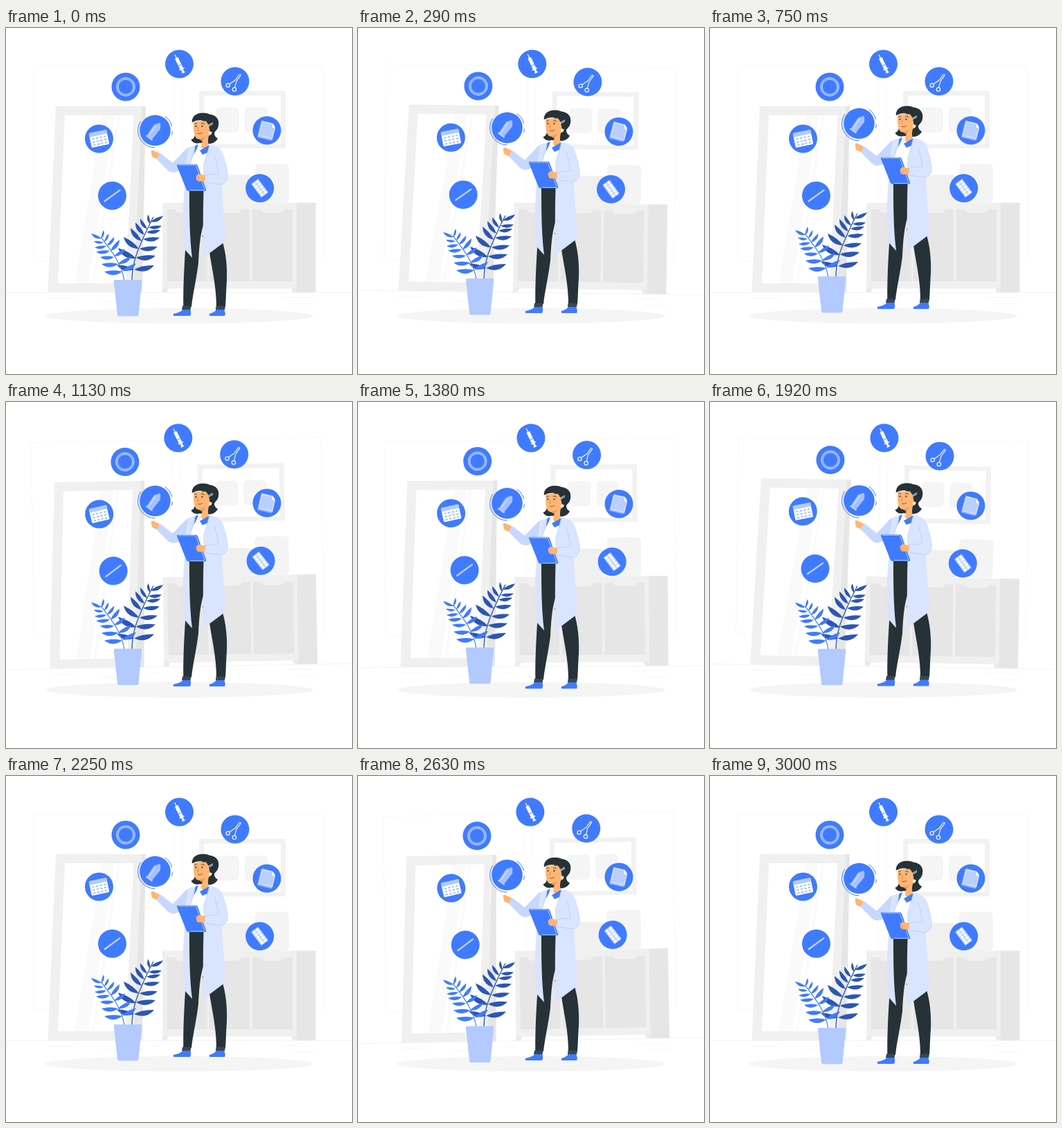
Animation of 500 by 500 pixels, one loop 3040 ms. Source, as an HTML page with a canvas:

```html
<!DOCTYPE html>
<html lang="en">
<head>
<meta charset="utf-8">
<title>Doctor with floating icons</title>
<style>
html, body { margin: 0; width: 100%; height: 100%; overflow: hidden; background: #fff; }
canvas { display: block; width: 100vw; height: 100vh; }
</style>
</head>
<body>
<canvas id="stage"></canvas>
<script>
const canvas = document.getElementById('stage');
const ctx = canvas.getContext('2d');
const dpr = Math.max(1, window.devicePixelRatio || 1);
canvas.width = canvas.height = 500 * dpr;

const BLUE = '#407bff', NAVY = '#2c56b3', PALE = '#b3caff', COAT = '#d9e4ff';
const SKIN = '#ffb573', HAIR = '#263238', PANTS = '#263238';
const LOOP = 3040, FPS = 24, RAD = Math.PI / 180;

function fill(color, d) {
  ctx.fillStyle = color;
  ctx.fill(new Path2D(d));
}
function line(color, width, d) {
  ctx.strokeStyle = color;
  ctx.lineWidth = width;
  ctx.stroke(new Path2D(d));
}
function box(color, x, y, w, h, r = 0) {
  ctx.fillStyle = color;
  ctx.beginPath();
  ctx.roundRect(x, y, w, h, r);
  ctx.fill();
}
function disc(color, x, y, r, ry = r) {
  ctx.fillStyle = color;
  ctx.beginPath();
  ctx.ellipse(x, y, r, ry, 0, 0, 7);
  ctx.fill();
}
function arc(color, width, x, y, r, from = 0, to = 360) {
  ctx.strokeStyle = color;
  ctx.lineWidth = width;
  ctx.beginPath();
  ctx.arc(x, y, r, from * RAD, to * RAD);
  ctx.stroke();
}
function lift(dy, draw) {
  ctx.save();
  ctx.translate(0, dy);
  draw();
  ctx.restore();
}
function turn(deg, x, y, draw) {
  ctx.save();
  ctx.translate(x, y);
  ctx.rotate(deg * RAD);
  ctx.translate(-x, -y);
  draw();
  ctx.restore();
}
// Local axes centred on x, y and tilted
function local(x, y, deg, draw) {
  ctx.save();
  ctx.translate(x, y);
  ctx.rotate(deg * RAD);
  draw();
  ctx.restore();
}

function room() {
  // wall panels and floor
  ctx.strokeStyle = '#f8f8f8';
  ctx.lineWidth = 0.8;
  ctx.strokeRect(39, 55, 204, 282.5);
  ctx.strokeRect(255, 55, 203, 282.5);
  line('#f0f0f0', 0.8, 'M0 382.4H500');
  line('#f5f5f5', 0.8, 'M60 390.5H97M135 395.5H196M400 389.5H441M415 398.5H448M206 391H222');

  // mirror
  fill('#e6e6e6', 'M195 113H202L197 382H184Z');
  fill('#f0f0f0', 'M72 113H196.5L184.5 382H60.5Z');
  fill('#fff', 'M85 126H184.5L173 369H75Z');
  fill('#fafafa', 'M139 126H157L119 369H99Z M162 126H165L127.5 369H124Z');

  // picture
  box('#f2f2f2', 279, 91, 125, 83);
  box('#fff', 286, 97.5, 111, 70);
  box('#f5f5f5', 303, 115, 34, 36, 6);
  box('#f5f5f5', 345, 115, 33, 36, 6);

  // cabinet
  box('#f0f0f0', 300, 212.5, 57, 40, 6);
  box('#f4f4f4', 360, 196.5, 49, 56, 6);
  box('#e6e6e6', 419.5, 252.5, 28, 129.5);
  box('#f0f0f0', 226, 252.5, 194, 124);
  fill('#ebebeb', 'M226 376H235L232 382H226Z M412 376H420V382H414Z');
  for (const x of [232.5, 294, 356])
    fill('#e6e6e6', `M${x} 262H${x + 11}Q${x + 14} 267 ${x + 19} 267H${x + 39}Q${x + 44} 267 ${x + 47} 262H${x + 58}V366H${x}Z`);
}

function syringe() {
  box('#fff', -0.6, -15, 1.2, 6);
  box('#fff', -2.5, -10, 5, 18, 1);
  box(BLUE, -2.5, 1.5, 5, 0.8);
  box('#fff', -4, 7.5, 8, 1.4);
  box('#fff', -1.5, 8, 3, 5);
  box('#fff', -2.4, 12.8, 4.8, 1.6, 0.6);
}
function scissors() {
  line('#fff', 1.1, 'M-8.3 4.2L0 -1.5L6 -9.5M-0.5 9.2L2 0L8 -8.5Q8 -10.3 6 -9.5');
  arc('#fff', 1.2, -10.3, 5.7, 2.6);
  arc('#fff', 1.2, -1, 11.8, 2.7);
}
function pad() {
  box('#8fb2ff', -11, -10, 21, 23, 1);
  fill('#d0deff', 'M-10.5 -12H6L11 -6V11H-10.5Z');
  box('#b3caff', -8.5, -9.5, 17.5, 18.5);
  fill('#fff', 'M6 -12V-6H11Z');
  for (let y = -7; y < 9; y += 3) line('#cfddff', 0.7, `M-7.5 ${y}H${y < -5 ? 4 : 8}`);
}
function pills() {
  box('#c6d7ff', -6.3, -12.3, 12.6, 24.6, 1);
  for (let i = 0; i < 10; i++) disc('#fff', i % 2 ? 2.9 : -2.9, (i >> 1) * 4.7 - 9.4, 2);
}
function stick() {
  ctx.lineCap = 'round';
  line('#c4d6ff', 2.2, 'M-13.5 0H13.5');
  ctx.lineCap = 'butt';
}
function calendar() {
  box('#fff', -13, -10.5, 26, 21, 1.5);
  box(PALE, -13, -10.5, 26, 5.6, 1.5);
  for (let i = 0; i < 12; i++)
    box('#a9c4ff', (i % 4) * 5.6 - 10, Math.floor(i / 4) * 4.5 - 2.6, 3.4, 2.2, 0.4);
}
function ring() {
  arc('#86aaff', 3.4, 0, 0, 12);
  arc('#c0d3ff', 0.9, 0, 0, 13.3);
  arc('#b3caff', 0.8, 0, 0, 10.7);
}

const icons = [
  [250.5, 52, -26, syringe],
  [331, 77, 0, scissors],
  [377, 148, 14, pad],
  [366.7, 231.5, -37, pills],
  [153.5, 242.3, -36, stick],
  [134.5, 160, -12, calendar],
  [173, 85, 0, ring]
];
function orbit() {
  for (const [x, y, tilt, draw] of icons) {
    disc(BLUE, x, y, 20.5);
    local(x, y, tilt, draw);
  }
}

// A leaf with its belly on the lower side
function leaf(color, bx, by, tx, ty) {
  const dx = tx - bx, dy = ty - by, side = Math.sign(dx);
  const ctrl = (at, k) => `${bx + dx * at - dy * k * side} ${by + dy * at + dx * k * side}`;
  fill(color, `M${bx} ${by}Q${ctrl(0.52, 0.38)} ${tx} ${ty}Q${ctrl(0.42, -0.14)} ${bx} ${by}`);
}
// Each leaf: base x, y, tip x, y
const darkLeaves = [
  [208, 283, 205.5, 269.5], [204, 291, 194, 275.5], [200, 299, 187, 281],
  [196, 308, 180, 289], [192, 319, 170, 302], [188, 333, 162, 318], [185, 349, 160, 342],
  [209, 280, 227, 271.5], [206, 288, 225, 286], [203, 295, 223, 292],
  [198, 305, 222, 303], [193, 319, 219, 316], [188, 332, 216, 329], [185, 349, 214, 343]
];
const brightLeaves = [
  [138, 304, 123, 297], [141, 310, 127, 308], [145, 315, 128, 317],
  [150, 322, 130, 323.5], [156, 331, 136, 331], [162, 341, 138, 341], [168, 352, 142, 352],
  [138, 304, 141, 292], [142, 309, 148, 297], [146, 315, 156.5, 302],
  [151, 322, 164, 306], [156, 330, 172, 319], [162, 341, 181, 330], [168, 351, 188, 340]
];
function plant() {
  line(NAVY, 1.3, 'M182 366C182 340 190 322 198 304Q206 286 213 273');
  darkLeaves.forEach(l => leaf(NAVY, ...l));
  line(BLUE, 1.2, 'M171 366C168 342 154 324 137 302');
  brightLeaves.forEach(l => leaf(BLUE, ...l));
  fill(PALE, 'M157 364H195Q196.5 364 196.3 366L191.5 414Q191.2 416.5 189 416.5H163.5Q161.3 416.5 161 414L155.8 366Q155.6 364 157 364Z');
}

function badge() {
  disc(BLUE, 215.5, 148, 22.3);
  arc(BLUE, 1, 215.5, 148, 24.9, 90, 213);
  arc(BLUE, 1, 215.5, 148, 24.9, -55, -14);
  arc(BLUE, 1, 215.5, 148, 24.9, 3, 16);
  local(214, 149, 36, () => {
    fill('#a3c0ff', 'M-4.6 12L-5.4 -5C-5.8 -10 -2.4 -10.5 -1.8 -13Q0 -16 2 -13C2.8 -10.5 6 -10 5.4 -5L4.6 12Z');
    fill('#c3d5ff', 'M-3.4 10L-4 -5Q-3.6 -8 -1.4 -9L-1.4 10Z');
    box('#bdd1ff', -5.8, 10.8, 11.6, 2.2, 1.1);
  });
}

function legs() {
  fill(PANTS, 'M264 232H286L285 285C280 302 279 320 278 340C275 364 270 384 268 403H256.3C256 372 257.5 346 259 322C264 298 264 262 264 232Z');
  fill(PANTS, 'M284 300L312 306C318 324 320 346 319 366C318 380 318 391 317 403H304C304 375 298 350 294 324Z');
  fill('#37474f', 'M255 401.5H267.5L266.5 407.5H254Z M303.5 401.5H317L316 407.5H303Z');
  fill(BLUE, 'M256 407H266.5Q268 412 266 416H243Q241 415.5 242 413Q251 411.5 256 407Z');
  fill(BLUE, 'M304 407H315Q318 412 316 416H295Q293 415.5 294 413Q301 411 304 407Z');
}

function head() {
  // bob and rear lobe
  fill(HAIR, 'M290 125C300 123 309 130 307 140C306 146 302 149 301 152C301 156 304 158.5 306 159.5C303 166 296 168 290 167L280 166C274 168 269 165 267.5 161.5C272 160 274 155 273 148Z');
  fill(SKIN, 'M271.5 135C270.5 145 271 152 274 158C276 161 281 161.5 284 160L282 172L286 176L293 171Q291 163 293 156Q299 153 298 148L294 134Z');
  fill('#e59a5c', 'M279 160.6Q284 160 288 156Q286 162 282.5 163Z');
  // cap and fringe
  fill(HAIR, 'M268.8 136.5C268 128 275 122.5 284 122.7C290 122.8 295 124 297 127C304 128 308.5 133 307 141C306 147 303 149 299 151L294.5 149C294 144 293 139 289 134.5C282 132.5 275 132.5 268.8 136.5Z');
  disc(HAIR, 274.5, 142, 0.9, 1.2);
  disc(HAIR, 283.5, 142, 0.9, 1.2);
  line(HAIR, 0.8, 'M272.3 138.7Q274 137.3 276 138.1M282 138.1Q284.5 137 287 139');
  line('#dc8350', 0.8, 'M278 143L276.5 148H279');
  line('#7b4028', 0.8, 'M277 152.2Q280.5 154 284 151.2');
  disc('#fff', 295, 152, 2);
  line('#fff', 0.9, 'M292 140.5L299 136.8M293 142L299 138.6');
}

function woman() {
  badge();
  legs();
  // raised arm
  fill(SKIN, 'M209.5 178Q211 175.5 214 177.5L221 180.5L224 186L219 190L214.5 187.5Q210.5 187 210.5 183Z');
  fill('#c7d8ff', 'M223 181L241 195L261 174L272 170L269 196L248 207.5Q240 211 234 206L217.5 189Z');
  line(PALE, 0.7, 'M241 195L247 197');

  fill('#fff', 'M273 174L292 174L288 230H264L266 195Z');
  head();
  fill(BLUE, 'M273.5 170L278 168L276 174L271 184Z');
  fill(BLUE, 'M280 177L293.5 169.5L294 175L291 180L284 183Z');
  // coat
  fill(COAT, 'M273 170L263 174L260 195L257.5 238C255 270 255 295 256.5 318L269 332C265 300 265 265 265 236L266 197L272 182Z');
  fill(COAT, 'M294 169C303 170 310 173 313 182L312 235L317 298L316 309L286 331.5C284.5 300 284.5 270 285.5 240L285 200L291 180Z');
  line(PALE, 0.6, 'M294 169L291 180L285 200M273 171L266 197');
  // tablet
  fill(BLUE, 'M248.5 197H274Q276 197 277 199L289 233Q289.5 235.5 287.5 235.5H264Q261.5 235.5 260.5 233L247 199Q246.5 197 248.5 197Z');
  line('#dbe6ff', 0.7, 'M249 198H272.5Q274.3 198 275 200L286.8 232.5Q287.3 234.4 285.3 234.4H266');
  // near arm
  fill(COAT, 'M300 171C311 172 315 182 317 194L320 211C321 221 316 226 308 226L287 222.5L286.5 212.5L307 210L304 193Z');
  line(PALE, 0.7, 'M301 183L304 194L307 210L286.5 212.5M317 194L320 211C321 221 316 226 308 226L287 222.5');
  fill(SKIN, 'M288 213L280 211Q275 211.5 274.8 215Q274.5 220 278 221.5L287.5 221.5Z');
  line('#e59a5c', 0.5, 'M275.5 216.5H280M276.2 219H280');
}

const float = p => -10 * (1 - Math.abs(1 - 2 * p));
function sway(p) {
  if (p < 0.25) return p * 4;
  return p < 0.75 ? 2 - p * 4 : p * 4 - 4;
}

function draw(ms) {
  // steps at 24 per second; the last step equals the first
  const t = Math.floor((ms % LOOP + 4.9) * FPS / 1000) % 72 / FPS;
  const quick = t / 1.5 % 1, slow = t / 3;
  ctx.setTransform(dpr, 0, 0, dpr, 0, 0);
  ctx.fillStyle = '#fff';
  ctx.fillRect(0, 0, 500, 500);
  turn(sway(quick), 250, 229, room);
  disc('#f5f5f5', 249.7, 416, 194, 11);
  turn(sway(quick), 256, 147, orbit);
  lift(float(slow), plant);
  lift(float(quick), woman);
}

let start;
function tick(now) {
  if (start === undefined) start = now;
  draw(now - start);
  requestAnimationFrame(tick);
}
draw(0);
requestAnimationFrame(tick);
</script>
</body>
</html>
```
